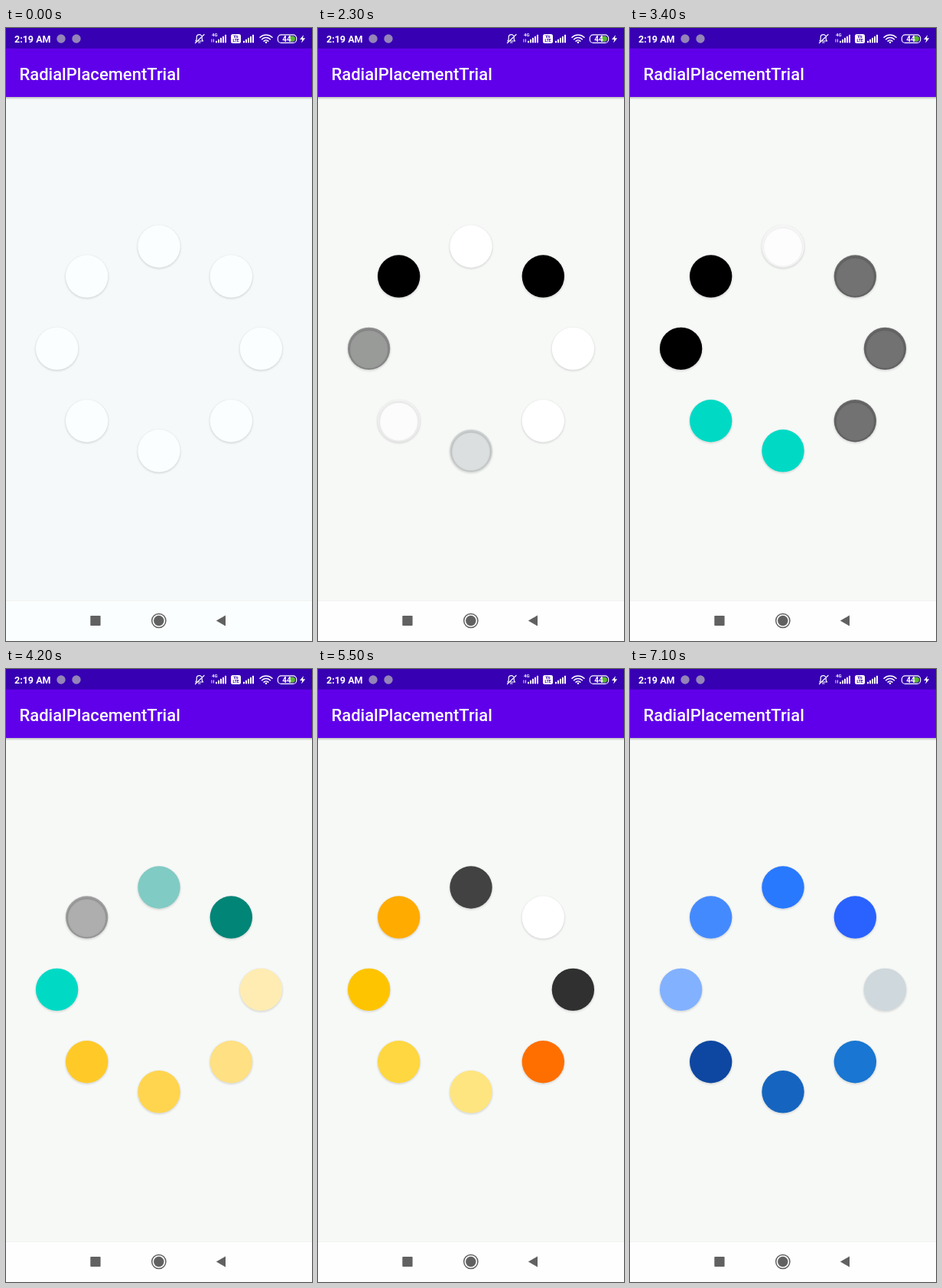
Recreate the animation shown at these times as an HTML page. Size 400 by 800 pixels, loop 7.2 s.

```html
<!DOCTYPE html>
<html lang="en">
<head>
<meta charset="utf-8">
<title>Colour ring</title>
<style>
  html, body { margin: 0; width: 100%; height: 100%; overflow: hidden; background: #f7f9f7; }
  svg { display: block; width: 100vw; height: 100vh; }
  text { font-family: Roboto, "Open Sans", sans-serif; fill: #fff; }
</style>
</head>
<body>
<svg viewBox="0 0 400 800">
  <defs>
    <filter id="soft" x="-20%" y="-20%" width="140%" height="140%">
      <feGaussianBlur stdDeviation=".8"/>
    </filter>
    <linearGradient id="barShadow" x2="0" y2="1">
      <stop offset="0" stop-opacity=".24"/>
      <stop offset="1" stop-opacity="0"/>
    </linearGradient>
    <g id="shadow" fill="none" stroke="#000">
      <circle cy="1.1" r="26.7" stroke-width="3.2" stroke-opacity=".13" filter="url(#soft)"/>
      <circle cy="1" r="25.5" stroke-width="1" stroke-opacity=".12"/>
    </g>
  </defs>

  <rect id="page" y="90" width="400" height="658"/>
  <rect y="90" width="400" height="3.5" fill="url(#barShadow)"/>
  <rect y="26" width="400" height="64" fill="#6000ea"/>
  <rect width="400" height="26.7" fill="#3700b3"/>
  <text x="17.5" y="68" font-size="22" font-weight="500">RadialPlacementTrial</text>

  <!-- status bar -->
  <text x="11" y="18.5" font-size="12.5" font-weight="700">2:19 AM</text>
  <g fill="#9484b8">
    <circle cx="72" cy="14" r="5.7"/>
    <circle cx="92" cy="14" r="5.7"/>
  </g>
  <g fill="none" stroke="#fff" stroke-width="1.2" stroke-linecap="round" stroke-linejoin="round">
    <path d="M248 17h9.5l-1.3-2.2v-2.6a3.5 3.5 0 0 0-7 0v2.6zM251.5 19h2.5M247.5 19.5L259 8.5"/>
    <path d="M332 12.2a11.5 11.5 0 0 1 16 0M334.6 14.7a7.6 7.6 0 0 1 10.8 0M337.2 17.1a4 4 0 0 1 5.6 0" stroke-width="1.6"/>
    <rect x="355.3" y="8.8" width="24.4" height="10.6" rx="4.5"/>
  </g>
  <circle cx="340" cy="18.8" r="1.3" fill="#fff"/>
  <text x="269" y="11" font-size="6" font-weight="700">4G</text>
  <path d="M269 14.5v4M271.5 18.5v-4" stroke="#fff" stroke-width=".9"/>
  <g id="signals" fill="#fff"></g>
  <rect x="294" y="8" width="13" height="12" rx="2.5" fill="#fff"/>
  <g font-size="5" font-weight="700" text-anchor="middle">
    <text x="300.5" y="13" style="fill:#3700b3">Vo</text>
    <text x="300.5" y="18.4" style="fill:#3700b3">LTE</text>
  </g>
  <path d="M371 10.5h4q3 0 3 3.6t-3 3.6h-4z" fill="#58b830"/>
  <text x="367" y="17.6" font-size="10" font-weight="700" text-anchor="middle">44</text>
  <path d="M389 9l-5 6h3.2l-1 4.5 5-6.2h-3.2z" fill="#fff"/>

  <g id="ring"></g>

  <!-- navigation bar -->
  <rect id="nav" y="748" width="400" height="52"/>
  <rect y="747" width="400" height="1" fill="#f1f3f1"/>
  <g fill="#616161">
    <rect x="110.3" y="767" width="13.3" height="13" rx=".8"/>
    <circle cx="199.8" cy="773.5" r="6.7"/>
    <circle cx="199.8" cy="773.5" r="9.1" fill="none" stroke="#616161" stroke-width="1.5"/>
    <path d="M274.8 773.6L287 766.6v14z"/>
  </g>
</svg>
<script>
const LOOP = 7200, START = 1300, STEP = 100, COUNT = 8;
const byId = id => document.getElementById(id);

function add(parent, tag, attrs) {
  const node = document.createElementNS("http://www.w3.org/2000/svg", tag);
  for (const key in attrs) node.setAttribute(key, attrs[key]);
  return parent.appendChild(node);
}

// One colour per step, dealt clockwise from the top; eight digits are translucent.
const palette = [
  "00000000 00000000 03dac5 ffffff 9aa3a64d ffffff80 00000061 000000",
  "ffffff 000000 ffffff 000000de 7fa87f 7fa87f 000000 000000",
  "ffffffb3 0000008a 0000008a 0000008a 00dac5 00dac5 00dac5 0000004d",
  "80cbc4 008577 ffecb3 ffe082 ffd54f ffca28 fff8e1 ffc107",
  "ffb300 ffa000 ff8f00 ff6f00 ffe57f ffd740 ffc400 ffab00",
  "424242 ffffff 303030 fafafa bbdefb 90caf9 64b5f6 42a5f5",
  "e3f2fd 2196f3 1e88e5 1976d2 1565c0 0d47a1 82b1ff 448aff",
  "2979ff 2962ff cfd8dc"
].join(" ").split(" ").map(hex => "#" + hex);

const discs = Array.from({ length: COUNT }, (_, i) => {
  const angle = i * 2 * Math.PI / COUNT;
  const x = 200 + 133.4 * Math.sin(angle), y = 418.4 - 133.4 * Math.cos(angle);
  const group = add(byId("ring"), "g", { transform: `translate(${x} ${y})` });
  add(group, "use", { href: "#shadow" });
  return add(group, "circle", { r: 27.7 });
});

for (const left of [274, 310]) {
  for (let i = 0; i < 5; i++) {
    const height = 2.5 + i * 2;
    add(byId("signals"), "rect", { x: left + i * 3, y: 19.3 - height, width: 2, height });
  }
}

function draw(time) {
  const step = Math.floor((time - START) / STEP);
  const cool = step < 2;
  const white = cool ? "#fbfefe" : "#fefefe";
  byId("page").setAttribute("fill", cool ? "#f6f9fa" : "#f7f9f7");
  byId("nav").setAttribute("fill", white);
  discs.forEach((disc, i) => {
    const latest = step - (step - i + COUNT) % COUNT;
    disc.setAttribute("fill", step >= i ? palette[latest] : white);
  });
}

function tick() {
  draw(performance.now() % LOOP);
  requestAnimationFrame(tick);
}
tick();
</script>
</body>
</html>
```
